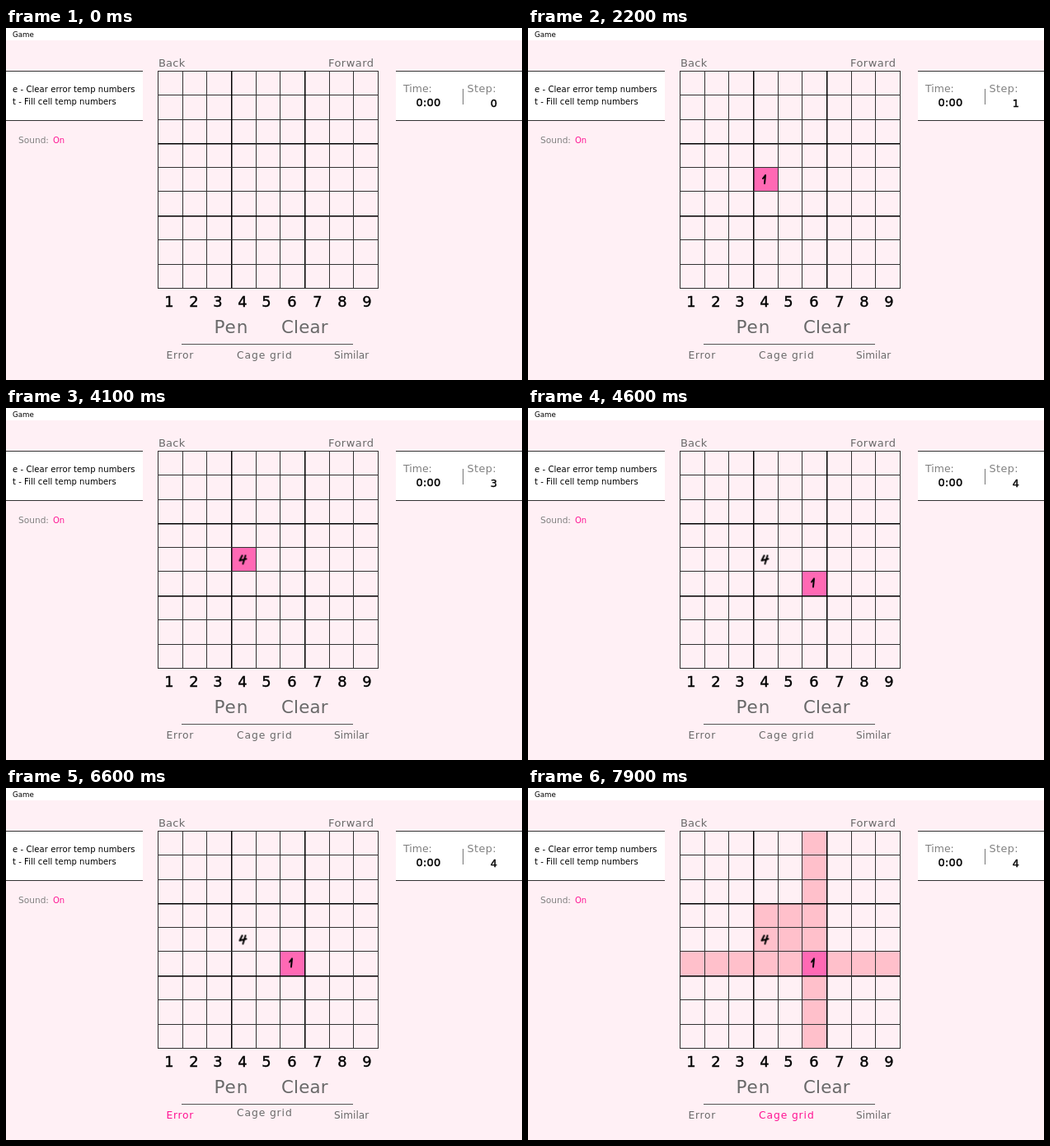
Animation, 626 px wide and 428 px high, one loop 8000 ms. Source, as an HTML page:

```html
<!DOCTYPE html>
<html lang="en">
<head>
<meta charset="utf-8">
<title>Sudoku</title>
<style>
  html, body { margin: 0; width: 100%; height: 100%; overflow: hidden; background: #fff0f5; }
  svg { display: block; width: 626px; height: 428px; font-family: "DejaVu Sans", sans-serif; }
  .ink { fill: #000; }
  .label { fill: #696969; }
  .soft { fill: #808080; }
  .accent { fill: #ff1493; }
  .strong { fill: #000; stroke: #000; stroke-width: .4; }
  .pen { fill: none; stroke: #000; stroke-width: 2; stroke-linecap: round; stroke-linejoin: round; }
</style>
</head>
<body>
<svg id="stage" viewBox="0 0 626 428"></svg>
<script>
const LOOP = 8000;
const GRAY = '#696969', PINK = '#ff1493';
const stage = document.getElementById('stage');

function add(tag, attrs, text) {
  const el = document.createElementNS('http://www.w3.org/2000/svg', tag);
  for (const name in attrs) el.setAttribute(name, attrs[name]);
  if (text !== undefined) el.textContent = text;
  return stage.appendChild(el);
}

const rect = (x, y, width, height, fill) => add('rect', { x, y, width, height, fill });

const label = (text, x, y, size, cls, spacing = 0, anchor = 'start') =>
  add('text', { x, y, class: cls, 'font-size': size, 'letter-spacing': spacing, 'text-anchor': anchor }, text);

// steps: [time, value] pairs, starting at 0
function play(el, prop, steps, easing = 'step-end') {
  const frames = steps.map(([t, v]) => ({ offset: t / LOOP, [prop]: v, easing }));
  frames.push({ offset: 1, [prop]: steps[steps.length - 1][1] });
  el.animate(frames, { duration: LOOP, iterations: Infinity });
}

const show = (el, from, to = LOOP) => {
  const steps = [[0, 0], [from, 1]];
  if (to < LOOP) steps.push([to, 0]);
  play(el, 'opacity', steps);
};

const lift = (el, up, down) => play(el, 'transform', [
  [0, 'translateY(0px)'], [up, 'translateY(0px)'], [up + 200, 'translateY(-3px)'],
  [down, 'translateY(-3px)'], [down + 200, 'translateY(0px)']
], 'ease');

// Menu and side panels
rect(0, 0, 626, 15, '#fff');
label('Game', 8, 11, 8.7, 'ink');
for (const [x, w] of [[0, 166], [473, 153]]) {
  rect(x, 52, w, 60, '#fff');
  rect(x, 52, w, 1, '#333');
  rect(x, 112, w, 1, '#333');
}
label('e - Clear error temp numbers', 8, 78, 10, 'ink', .08);
label('t - Fill cell temp numbers', 8, 92.5, 10, 'ink', .05);
label('Sound:', 15, 140, 10.6, 'soft');
label('On', 57, 140, 10, 'accent');
label('Time:', 482, 78, 12.5, 'soft');
label('Step:', 559.5, 78, 12.8, 'soft', .4);
label('0:00', 497.5, 95, 13, 'strong', .2);
rect(554, 74, 1, 19, '#777');

// Step counter
const stepTimes = [0, 2000, 2800, 3600, 4500, LOOP];
for (let i = 0; i < 5; i++) {
  const el = label(i, 596, 95.5, 12.8, 'strong', 0, 'end');
  if (i) show(el, stepTimes[i], stepTimes[i + 1]);
  else play(el, 'opacity', [[0, 1], [stepTimes[1], 0]]);
}

// Board
const gx = i => Math.round(184 + i * 29.68);
const gy = i => Math.round(52 + i * 29.35 - (i === 5 ? 1 : 0));
const area = (c, r, w, h, fill) => rect(gx(c), gy(r), gx(c + w) - gx(c), gy(r + h) - gy(r), fill);

for (const box of [[5, 0, 1, 9], [0, 5, 9, 1], [3, 3, 3, 3]]) show(area(...box, '#ffc0cb'), 6800);
show(area(3, 4, 1, 1, '#ff69b4'), 1000, 4300);
show(area(5, 5, 1, 1, '#ff69b4'), 4300);

for (let i = 0; i < 10; i++) {
  const bold = i === 3 || i === 6;
  const w = bold ? 1.5 : 1, color = bold ? '#000' : '#333';
  rect(gx(i), 52, w, 265, color);
  rect(184, gy(i), 268, w, color);
}

// Handwritten digits, centred on their cell
const shapes = {
  1: 'M-2-1L1-5L0 5',
  2: 'M-3-2Q-1-6 2-4Q4-1-3 5Q0 3 3 4',
  4: 'M-1-4L-4 2L4 0M3-4L0 6'
};
const write = (digit, x, y, from, to) =>
  show(add('path', { d: shapes[digit], class: 'pen', transform: `translate(${x} ${y})` }), from, to);
write(1, 287, 184, 2000, 2800);
write(2, 287.5, 184, 2800, 3600);
write(4, 287.5, 183.5, 3600);
write(1, 346, 212.5, 4500);

// Controls
label('Back', 185, 47, 13, 'label', .2);
label('Forward', 391, 47, 13, 'label', .45);
[198, 228, 257, 287, 316, 347, 378, 408, 438].forEach((x, i) =>
  label(i + 1, x, 339, 17.8, 'strong', 0, 'middle'));
label('Pen', 252.5, 371, 21.5, 'label', .9);
label('Clear', 334, 371, 21.3, 'label', .2);
rect(213, 384, 208, 1, '#555');

const error = label('Error', 194.5, 402, 12.3, 'label', .7);
const cage = label('Cage grid', 280, 402, 12.3, 'label', .9);
label('Similar', 398, 402, 12.1, 'label', .05);

lift(error, 5300, 6100);
play(error, 'fill', [[0, GRAY], [5800, PINK], [6800, GRAY]]);
lift(cage, 6300, 7100);
play(cage, 'fill', [[0, GRAY], [6800, PINK]]);
</script>
</body>
</html>
```
